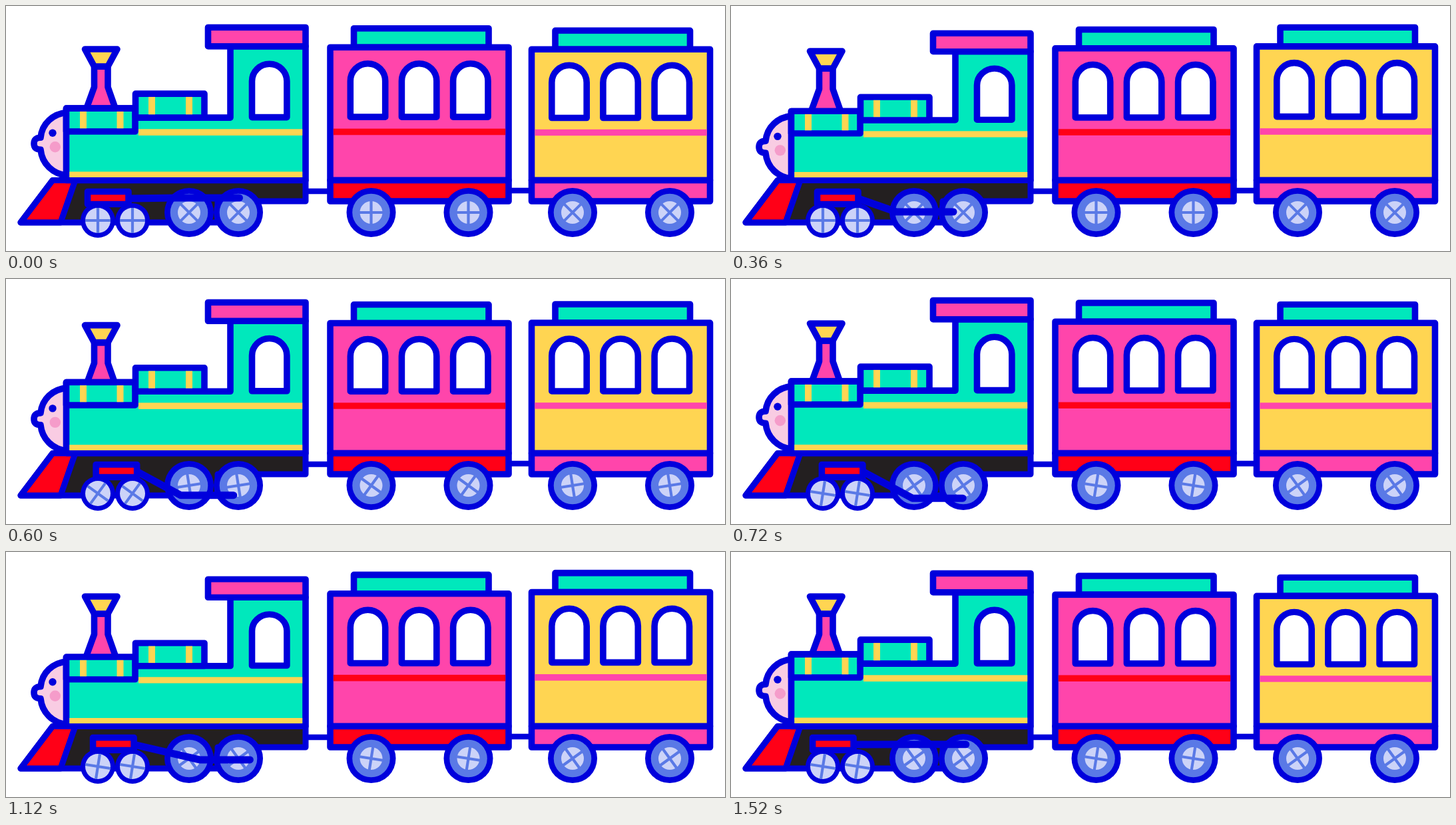
An HTML page that plays this animation: 1080 by 369 pixels, repeating every 1.56 s.

```html
<!DOCTYPE html>
<html lang="en">
<head>
<meta charset="utf-8">
<title>Toy train</title>
<style>
html, body { margin: 0; width: 100%; height: 100%; overflow: hidden; background: #fff; }
svg { display: block; width: 100%; height: 100%; }
.o { stroke: #0000dc; stroke-width: 9.6; stroke-linejoin: round; stroke-linecap: round; }
</style>
</head>
<body>
<svg id="stage" viewBox="0 0 1080 369" xmlns="http://www.w3.org/2000/svg"></svg>
<script>
const BLUE = '#0000dc', GREEN = '#00e8bc', PINK = '#ff45ab', YELLOW = '#ffd552',
      RED = '#ff0017', BLACK = '#231f20', RING = '#5a79e6', HUB = '#ccd3f8';
const FLOOR = 262.5, STEP = 40, LOOP = 1560;
const stage = document.getElementById('stage');

const box = (x1, y1, x2, y2, fill, cls = 'o') =>
  `<rect class="${cls}" x="${x1}" y="${y1}" width="${x2 - x1}" height="${y2 - y1}" fill="${fill}"/>`;
const band = (x1, y1, x2, y2, fill) => box(x1, y1, x2, y2, fill, '');
const path = (d, fill = 'none', extra = '') => `<path class="o" d="${d}" fill="${fill}" ${extra}/>`;
const dot = (x, y, r, fill) => `<circle cx="${x}" cy="${y}" r="${r}" fill="${fill}"/>`;
const pane = (x, y1, y2) =>
  path(`M${x} ${y2}V${y1 + 26.2}a26.2 26.2 0 0 1 52.4 0V${y2}Z`, '#fff');

// Spokes turn inside a fixed rim; a is the starting angle.
function spokes(x, y, r, a) {
  return `<path class="spin" data-x="${x}" data-y="${y}" data-a="${a}" d="M${-r} 0H${r}M0 ${-r}V${r}" stroke="${RING}" stroke-width="4.2"/>`;
}
const bigWheel = (x, a) =>
  dot(x, 311, 37, BLUE) + dot(x, 311, 28.3, RING) + dot(x, 311, 17, HUB) + spokes(x, 311, 17.5, a);
const smallWheel = x => dot(x, 323, 26, BLUE) + dot(x, 323, 19, HUB) + spokes(x, 323, 19, 0);

function car(id, x, main, stripe, angle) {
  return `<g transform="translate(${x})"><g id="${id}">` +
    box(35.5, 34, 238, 62.5, GREEN) +
    box(0, 62.5, 268, FLOOR, main) +
    band(4.8, 184.8, 263.2, 194.4, stripe) +
    [30.3, 107.4, 184.6].map(w => pane(w, 87, 167.3)).join('') +
    '</g>' + box(0, FLOOR, 268, 294, stripe) +
    bigWheel(61.5, angle) + bigWheel(207.5, angle) + '</g>';
}

const face = '<g id="face">' +
  path('M92 160C70 162 54 177 52 198Q42 198 42 207T52 216C54 237 70 253 92 255Z', '#f9cce3') +
  dot(70, 191, 5.7, BLUE) + dot(73.8, 212, 8.2, '#f59cca') + '</g>';

const stack = '<g id="stack">' +
  path('M132.5 91H153V122L167 162H118L132.5 122Z', PINK) +
  path('M118.5 65H167L153 91H132.5Z', YELLOW) + '</g>';

const body = '<g id="body">' +
  path(`M90.5 154H194V168H337V60.5H450V${FLOOR}H90.5Z`, GREEN) +
  band(199, 185.3, 445.2, 195, YELLOW) + band(95.3, 249.5, 445.2, 258, YELLOW) +
  box(90.5, 154, 194, 189, GREEN) +
  band(111, 158.8, 121, 184.2, YELLOW) + band(166.5, 158.8, 176.5, 184.2, YELLOW) +
  box(194.5, 132, 298, 168, GREEN) +
  band(214, 136.8, 224, 163.2, YELLOW) + band(270, 136.8, 280, 163.2, YELLOW) +
  box(303.5, 32, 450, 60.5, PINK) + pane(369.5, 87, 167.5) + '</g>';

const chassis =
  path(`M70 ${FLOOR}H450V294H318V326H22Z`, BLACK, 'style="stroke-width:9"') +
  path(`M70 ${FLOOR}H104L82 326H22Z`, RED, 'style="stroke-width:9"');

stage.innerHTML = path('M450 279H487M755 278H790', 'none', 'style="stroke-width:8.5"') +
  face + stack + chassis + body + bigWheel(275, 45) + bigWheel(349, 45) +
  path('', 'none', 'id="rod" style="stroke-width:11"') +
  `<g id="piston">${box(122.5, 279.5, 184, 298.5, RED)}</g>` +
  smallWheel(138) + smallWheel(190) +
  car('carA', 487, PINK, RED, 0) + car('carB', 789.5, YELLOW, PINK, 45);

const part = id => document.getElementById(id);
const [faceG, stackG, bodyG, rod, piston, carA, carB] =
  ['face', 'stack', 'body', 'rod', 'piston', 'carA', 'carB'].map(part);
const spinners = [...document.querySelectorAll('.spin')];

const rad = Math.PI / 180;
const move = (el, x, y) => el.setAttribute('transform', `translate(${x.toFixed(2)} ${y.toFixed(2)})`);
const squash = (el, s) =>
  el.setAttribute('transform', `translate(0 ${FLOOR}) scale(1 ${s.toFixed(5)}) translate(0 ${-FLOOR})`);
// Crank motion: a sine flattened slightly towards a triangle wave.
const crank = a => 0.7 * Math.sin(a) + 0.6 / Math.PI * Math.asin(Math.sin(a));

function draw(ms) {
  const n = Math.floor((ms % LOOP) / STEP);
  const turn = n ? n + 1 : 0;
  const bob = peak => Math.cos((n + 1 - peak) * 18 * rad);

  squash(bodyG, 0.98 + 0.02 * bob(0));
  squash(carA, 0.995 + 0.016 * bob(4.7));
  squash(carB, 0.9955 + 0.0155 * bob(7.9));
  move(stackG, 0, 2 - 3.3 * bob(4));
  move(faceG, 0, 3 - 2.9 * bob(2));

  for (const s of spinners) {
    const { x, y, a } = s.dataset;
    s.setAttribute('transform', `translate(${x} ${y}) rotate(${a - 9 * turn})`);
  }

  const a = turn * 9 * rad;
  const slide = 7 * (1 - Math.cos(a));
  const endX = 350.5 - 16.5 * crank(a);
  const endY = 310 - 21 * crank(a + Math.PI / 2);
  const kneeX = 269 - 22 * Math.sin(a + 18 * rad);
  move(piston, slide, 0);
  rod.setAttribute('d', `M${184 + slide} 290L${kneeX} ${endY}L${endX} ${endY}`);
}

const start = performance.now();
function tick() {
  draw(performance.now() - start);
  requestAnimationFrame(tick);
}
draw(0);
requestAnimationFrame(tick);
</script>
</body>
</html>
```
